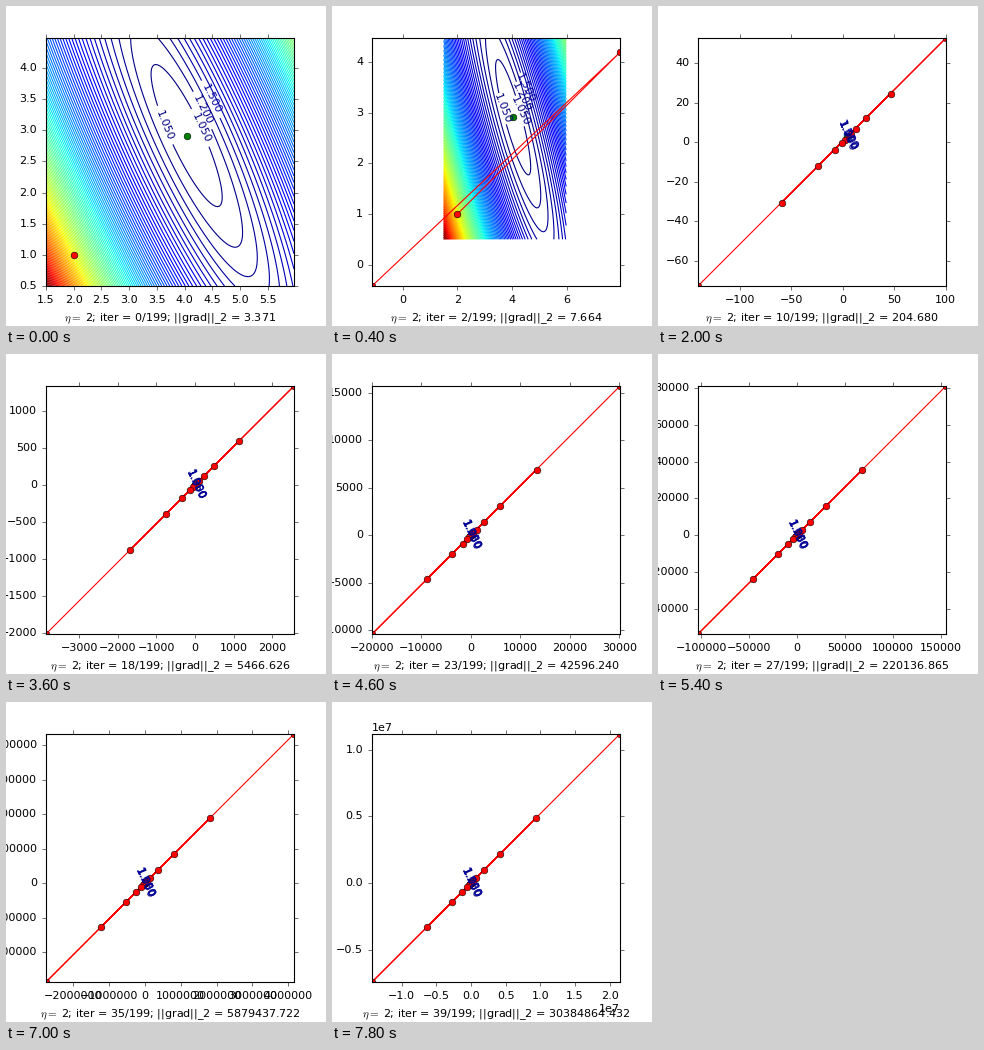
These frames come from a looping animation (320x320 px, 8000 ms). A matplotlib script:

```python
import numpy as np
import matplotlib.pyplot as plt
from matplotlib.animation import FuncAnimation
from matplotlib.ticker import ScalarFormatter

plt.style.use("classic")
plt.rcParams.update({
    "figure.facecolor": "white", "font.family": "DejaVu Sans", "font.size": 10,
    "xtick.direction": "out", "ytick.direction": "out",
    "mathtext.fontset": "cm",
})

STAGE, BOX = 320, 248
FRAMES, ETA = 40, 2
X_GRID, Y_GRID = (1.5, 5.97), (0.5, 4.48)

# Gradient descent on a quadratic, solved in its eigenbasis
NORM_31, NORM_39 = 1137664.708, 30384864.432
growth = (NORM_39 / NORM_31) ** (1 / 8)
norm_0 = NORM_39 / growth ** 39
lam1 = (1 + growth) / ETA
slope = 0.5204
mean_x = (lam1 - 1) / slope
mean_xx = lam1 - mean_x / slope
lam2 = 1 + mean_xx - lam1
v1 = np.array([1, slope]) / np.hypot(1, slope)
v2 = np.array([-v1[1], v1[0]])
a0, b0 = -norm_0 / lam1, -0.7586
best = np.array([2, 1]) - a0 * v1 - b0 * v2

steps = np.arange(FRAMES)
a = a0 * (1 - ETA * lam1) ** steps
b = b0 * (1 - ETA * lam2) ** steps
path = best + np.outer(a, v1) + np.outer(b, v2)
norms = np.hypot(lam1 * a, lam2 * b)


def cost(x, y):
    dx, dy = x - best[0], y - best[1]
    return 0.948 + dx ** 2 + 2 * mean_x * dx * dy + mean_xx * dy ** 2


class PowerFormatter(ScalarFormatter):
    """Switches to powers of ten once a tick reaches 1e7."""

    def _set_order_of_magnitude(self):
        top = max(abs(self.locs[0]), abs(self.locs[-1]))
        self.orderOfMagnitude = 7 if top > 9.99e6 else 0


def nice_ticks(lo, hi, bins=9):
    raw = (hi - lo) / bins
    scale = 10.0 ** np.floor(np.log10(raw))
    for mult in (1, 2, 5, 10, 20):
        step = mult * scale
        first = np.floor(lo / step)
        if step >= raw and (first + bins) * step >= hi:
            break
    return np.arange(first, np.ceil(hi / step) + 1) * step


def fit_axis(set_ticks, set_lim, values, grid):
    lo, hi = min(values.min(), grid[0]), max(values.max(), grid[1])
    ticks = nice_ticks(lo, hi)
    set_ticks(ticks)
    # let a tick less than half a pixel outside still show
    half = (hi - lo) / BOX / 2
    if lo - ticks[0] < half:
        lo = ticks[0]
    if ticks[-1] - hi < half:
        hi = max(hi, ticks[-1])
    set_lim(lo, hi)


def fit_view(k):
    pts = path[:k + 1]
    fit_axis(ax.set_xticks, ax.set_xlim, pts[:, 0], X_GRID)
    fit_axis(ax.set_yticks, ax.set_ylim, pts[:, 1], Y_GRID)


fig = plt.figure(figsize=(4, 4), dpi=80)
ax = fig.add_axes([40 / STAGE, 40 / STAGE, BOX / STAGE, BOX / STAGE])
ax.xaxis.set_major_formatter(PowerFormatter())
ax.yaxis.set_major_formatter(PowerFormatter())

gx, gy = np.meshgrid(np.linspace(*X_GRID, 150), np.linspace(*Y_GRID, 200))
levels = 1.05 + 0.15 * np.arange(95)
contours = ax.contour(gx, gy, cost(gx, gy), levels, cmap="jet")
fit_view(0)
ax.clabel(contours, fmt="%1.3f", fontsize=10, inline=True,
          manual=[(3.655, 3.085), (4.31, 3.05), (4.34, 3.325), (4.48, 3.5)])
ax.plot(*best, "go")
trail, = ax.plot([], [], "ro-")
caption = fig.text(164 / STAGE, 5 / STAGE, "", ha="center", va="baseline")


def draw(k):
    trail.set_data(path[:k + 1, 0], path[:k + 1, 1])
    fit_view(k)
    caption.set_text(rf"$\eta =$ {ETA}; iter = {k}/199; ||grad||_2 = {norms[k]:.3f}")
    return trail, caption


anim = FuncAnimation(fig, draw, frames=FRAMES, interval=200, repeat=True)
plt.show()
```
